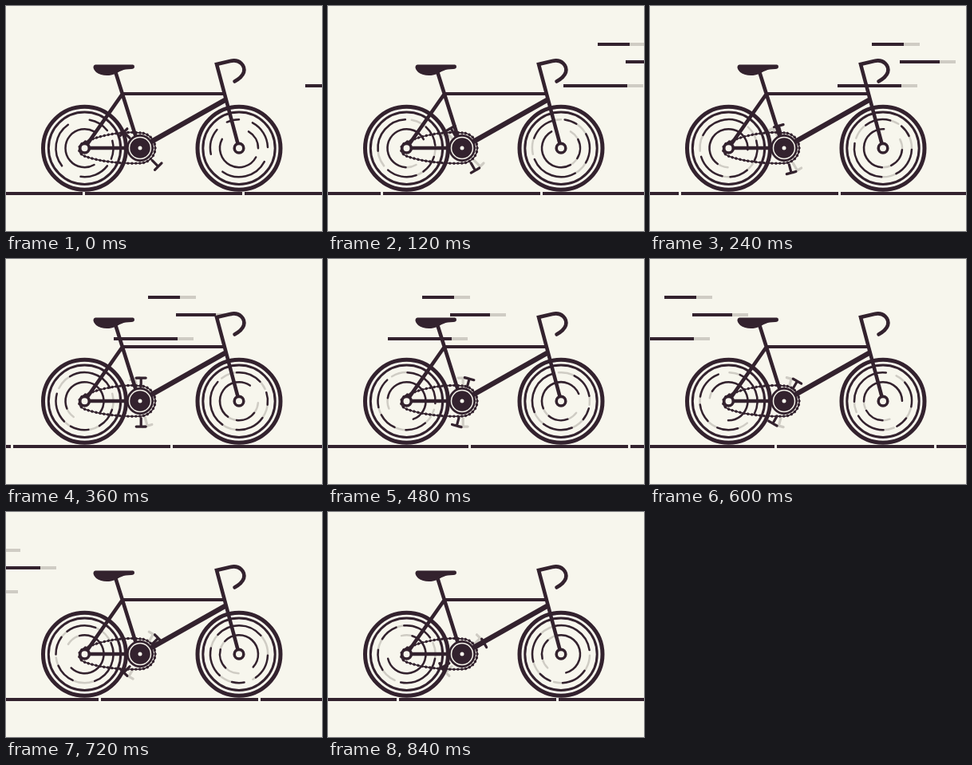
An HTML page that plays this animation: 396x282 px, repeating every 960 ms.

```html
<!DOCTYPE html>
<html lang="en">
<head>
<meta charset="utf-8">
<title>Bicycle</title>
<style>
  html, body { margin: 0; width: 100%; height: 100%; overflow: hidden; background: #f7f6ed; }
  svg { display: block; width: 100%; height: 100%; }
  .line { fill: none; stroke: #33222e; }
  .ghost .line { stroke: #cfccc4; }
  .solid { fill: #33222e; }
  .paper { fill: #f7f6ed; }
</style>
</head>
<body>
<svg viewBox="0 0 396 282">
  <defs>
    <path id="chainPath" d="M168 159C150 157 124 160 101 169.500C89 173 89 184 98 188C117 195 145 198 168 197A19 19 0 0 0 168 159"/>
  </defs>
  <path id="ground" class="line" d="M0 235H1000" stroke-width="4" stroke-dasharray="197 3"/>
  <g id="wind"></g>
  <g id="ghosts" class="ghost"></g>
  <g id="spinners"></g>
  <g id="rims"></g>

  <g class="line" stroke-width="4.600">
    <path d="M137 82L164 168M146 110L98.500 178H168"/>
    <path d="M146 110H274" stroke-width="4.200"/>
    <path d="M276 117L168 178" stroke-width="6.500"/>
    <path d="M292 178L264 73L281 69C293 66 300 75 298 83C296 89 291 92 286.500 94.500" stroke-linecap="round"/>
  </g>
  <path class="solid" d="M112 73.500H159Q161 73.500 161 76Q161 79 157 79C146 79 143 82 137 85C130 88 119 88 113 83Q109 79 109.500 76Q110 73.500 112 73.500Z"/>

  <use href="#chainPath" class="line" stroke-width="1.600"/>
  <use href="#chainPath" id="beads" class="line" stroke-width="3.400" stroke-linecap="round" stroke-dasharray="0.100 4.900"/>
  <circle class="solid" cx="168" cy="178" r="17"/>
  <circle cx="168" cy="178" r="13.500" fill="none" stroke="#f7f6ed" stroke-width="1.500"/>
  <circle class="paper" cx="168" cy="178" r="2.500"/>
  <g id="hubs"></g>
</svg>

<script>
const STEP = 120, STEPS = 8;
const HUB_Y = 178.2;
const DEG_PER_PX = 1.08;
const windX = [375, 295, 235, 135, 75, -25, -85, -185];
const gapX = [97.5, 67.5, 37.5, 7.5, -22.5, -42.5, -82.5, -112.5];

// Spin arcs: radius, start angle, end angle
const wheels = [
  { x: 98.5, arcs: [[36, 38, 98], [36, 142, 235], [36, -80, -38], [24, 60, 300], [36, -15, 22]] },
  { x: 292, arcs: [[36, 28, 125], [36, -62, -2], [36, 168, 220], [36, 245, 270], [24, 28, 208], [24, -60, 0]] }
];

const $ = id => document.getElementById(id);

function add(parent, tag, attrs) {
  const el = document.createElementNS('http://www.w3.org/2000/svg', tag);
  for (const key in attrs) el.setAttribute(key, attrs[key]);
  return parent.appendChild(el);
}

function arcPath(r, from, to) {
  const point = deg => {
    const a = deg * Math.PI / 180;
    return `${(r * Math.cos(a)).toFixed(2)} ${(r * Math.sin(a)).toFixed(2)}`;
  };
  return `M${point(from)}A${r} ${r} 0 ${to - from > 180 ? 1 : 0} 1 ${point(to)}`;
}

// The wheels roll with the ground; the cranks turn evenly
const rollAngle = step => (gapX[0] - gapX[step]) * DEG_PER_PX;
const crankAngle = step => 45 + 15 * step;

// Wheel arcs and pedals; returns a function that poses them at a step
function makeSpinners(parent) {
  const parts = wheels.map(({ x, arcs }) => {
    const el = add(parent, 'path', {
      class: 'line', 'stroke-width': 2.5, 'stroke-linecap': 'round',
      d: arcs.map(a => arcPath(...a)).join('')
    });
    return { el, x, y: HUB_Y, angle: rollAngle };
  });
  const pedals = add(parent, 'path', {
    class: 'line', 'stroke-width': 3.2, 'stroke-linecap': 'round',
    d: 'M20 0H30.5M30.5 -6V6M-20 0H-30.5M-30.5 -6V6'
  });
  parts.push({ el: pedals, x: 169.2, y: 179.6, angle: crankAngle });
  return step => {
    for (const { el, x, y, angle } of parts)
      el.setAttribute('transform', `translate(${x} ${y}) rotate(${angle(step)})`);
  };
}

for (const { x } of wheels) {
  const ring = (group, r, width, fill) => add($(group), 'circle',
    { cx: x, cy: HUB_Y, r, fill, stroke: '#33222e', 'stroke-width': width });
  ring('rims', 52, 5, 'none');
  ring('rims', 45.2, 3, 'none');
  ring('hubs', 5.8, 3.6, '#f7f6ed');
}

for (const [dx, y, length] of [[43, 48, 40], [78, 70, 50], [0, 100, 80]]) {
  add($('wind'), 'rect', { x: dx + length, y: y - 2, width: 20, height: 4, fill: '#cfccc4' });
  add($('wind'), 'rect', { x: dx, y: y - 2, width: length, height: 4, class: 'solid' });
}

const poseGhosts = makeSpinners($('ghosts'));
const poseSpinners = makeSpinners($('spinners'));
let shown = -1;

function draw(now) {
  const step = Math.floor(now / STEP) % STEPS;
  if (step === shown) return;
  shown = step;
  $('ground').setAttribute('transform', `translate(${gapX[step] - 198.5})`);
  $('wind').setAttribute('transform', `translate(${windX[step]})`);
  $('beads').setAttribute('stroke-dashoffset', -5 * step);
  $('ghosts').setAttribute('visibility', step ? 'visible' : 'hidden');
  poseGhosts(Math.max(step - 1, 0));
  poseSpinners(step);
}

const begin = performance.now();
function tick() {
  draw(performance.now() - begin);
  requestAnimationFrame(tick);
}
tick();
</script>
</body>
</html>
```
